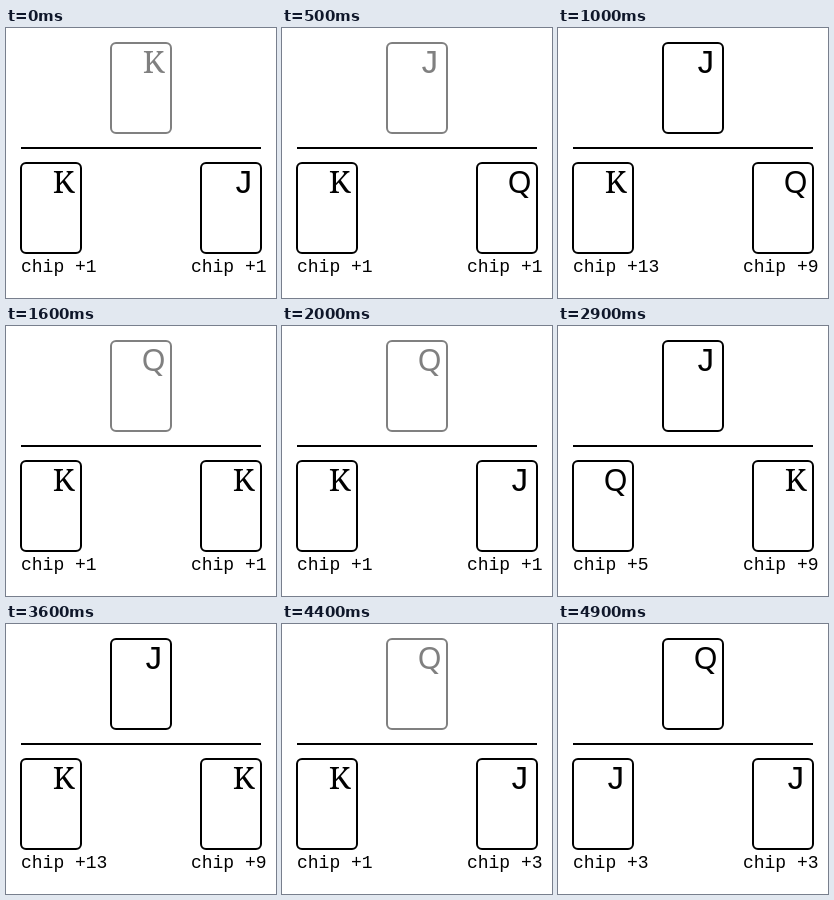
Animation, 270 px wide and 270 px high, one loop 5000 ms. Source, as an HTML page:

```html
<!DOCTYPE html>
<html lang="en">
<head>
<meta charset="utf-8">
<title>Card game</title>
<style>
  html, body { margin: 0; width: 100%; height: 100%; overflow: hidden; background: #fff; }
  svg { display: block; width: 100vw; height: 100vh; }
  rect { fill: #fff; stroke: currentColor; stroke-width: 2; }
  text { fill: currentColor; }
  .chip { font: 18px "Liberation Mono", "Courier New", monospace; }
  .rank { font: 34px "Liberation Mono", "Courier New", monospace; text-anchor: middle; }
  .rank.K { font: 31px "Noto Serif", serif; }
  .rank.Q { font: 31px "Noto Sans", sans-serif; }
</style>
</head>
<body>
<svg viewBox="0 0 270 270">
  <path d="M15 120H255" stroke="#000" stroke-width="2"/>
  <g class="card" transform="translate(15 135)"><rect width="60" height="90" rx="5"/><text class="rank" x="42.5" y="30"/></g>
  <g class="card" transform="translate(195 135)"><rect width="60" height="90" rx="5"/><text class="rank" x="42.5" y="30"/></g>
  <g class="card" transform="translate(105 15)"><rect width="60" height="90" rx="5"/><text class="rank" x="42.5" y="30"/></g>
  <text class="chip" x="15" y="243.5"/>
  <text class="chip" x="260.5" y="243.5" text-anchor="end"/>
</svg>
<script>
const STEP = 100;

// Cards (left, right, shared), who acts first, then actions: c = check/call, r = raise, f = fold
const HANDS = [
  ["KJK", 0, "ccrrf"],
  ["KQJ", 1, "rrcrrf"],
  ["KJQ", 1, "ccrrf"],
  ["KKQ", 0, "rccc"],
  ["KJQ", 0, "rcrrf"],
  ["QKJ", 0, "ccrrf"],
  ["KKJ", 1, "crrcrrf"],
  ["JQK", 1, "ccrrf"],
  ["KJQ", 0, "crcrf"],
  ["JJQ", 0, "rc"]
];

// One state per step; an action that ends the hand shows the next deal instead.
function play([cards, first, actions]) {
  const chips = [1, 1];
  const states = [{ cards, chips: [1, 1], open: false }];
  let player = first, turns = 0, open = false;
  for (const action of actions) {
    if (action === "f") break;
    const top = Math.max(...chips);
    chips[player] = action === "r" ? top + (open ? 4 : 2) : top;
    player = 1 - player;
    turns++;
    if (action === "c" && turns > 1) {
      if (open) break;
      open = true;
      turns = 0;
      player = first;
    }
    states.push({ cards, chips: [...chips], open });
  }
  return states;
}

const states = HANDS.flatMap(play);
const cardEls = document.querySelectorAll(".card");
const rankEls = document.querySelectorAll(".rank");
const chipEls = document.querySelectorAll(".chip");
let shown = -1;

function draw({ cards, chips, open }) {
  rankEls.forEach((el, i) => {
    el.textContent = cards[i];
    el.setAttribute("class", "rank " + cards[i]);
  });
  chipEls.forEach((el, i) => el.textContent = "chip +" + chips[i]);
  cardEls[2].style.color = open ? "#000" : "#808080";
}

const start = performance.now();
function tick() {
  const step = Math.floor((performance.now() - start) / STEP) % states.length;
  if (step !== shown) draw(states[shown = step]);
  requestAnimationFrame(tick);
}
tick();
</script>
</body>
</html>
```
